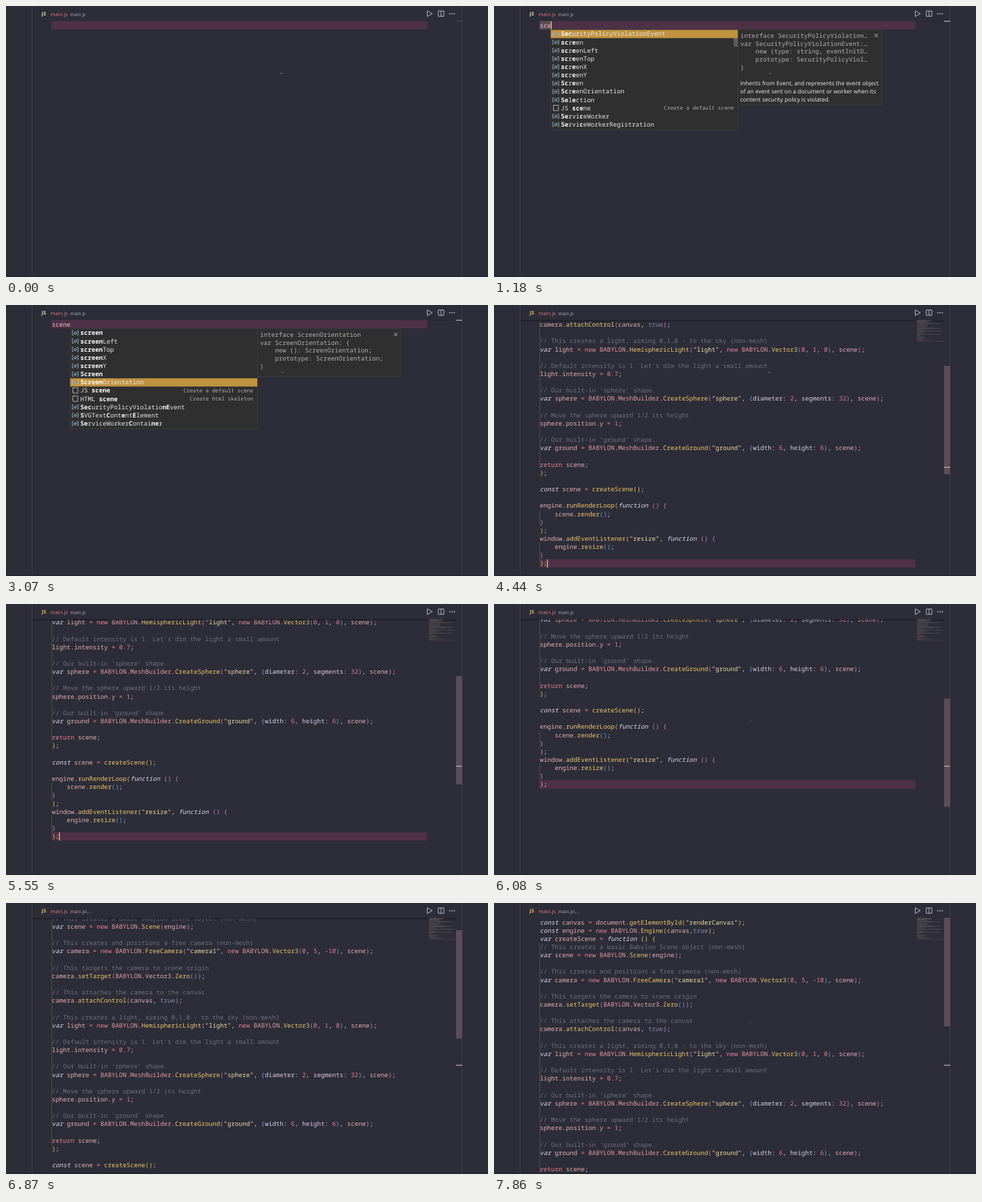
Animation of 710 by 400 pixels, one loop 8 s. Source, as an HTML page:

```html
<!DOCTYPE html>
<html lang="en">
<head>
<meta charset="utf-8">
<title>Editor snippet</title>
<style>
  html, body { margin: 0; width: 100%; height: 100%; overflow: hidden; background: #2c2d38; }
  svg { display: block; width: 710px; height: 400px; }
  text { white-space: pre; text-rendering: geometricPrecision; }
  .mono { font-family: "Noto Sans Mono", "DejaVu Sans Mono", monospace; font-size: 9.18px; }
  .ui { font-family: "Open Sans", "Noto Sans", sans-serif; }
  .b { font-weight: 700; fill: #fff; }
  .i { font-style: italic; }
</style>
</head>
<body>
<svg id="stage" viewBox="0 0 710 400" xmlns="http://www.w3.org/2000/svg">
  <defs>
    <clipPath id="view"><rect x="39" y="22" width="633" height="376"/></clipPath>
    <linearGradient id="shade" x1="0" y1="0" x2="0" y2="1">
      <stop offset="0" stop-color="#15161d" stop-opacity=".6"/>
      <stop offset="1" stop-color="#15161d" stop-opacity="0"/>
    </linearGradient>
  </defs>
  <rect width="710" height="400" fill="#2c2d38"/>
  <path d="M38.5 0V398M671.5 0V398" stroke="#3d3e4a"/>
  <rect y="398" width="710" height="2" fill="#262733"/>

  <g clip-path="url(#view)">
    <g id="doc">
      <rect id="row" x="67" width="553.5" height="12.2" fill="#4f3147"/>
      <rect id="word" x="67" y="22.3" height="12.2" fill="#5e4d56"/>
      <g id="code"></g>
      <text id="typed" class="mono" x="67.4" y="31.5" fill="#e4b9c1"></text>
      <rect id="caret" width="1.1" height="12" fill="#efd9a0"/>
    </g>
    <rect id="shadow" x="39" y="22" width="624" height="4" fill="url(#shade)"/>
    <rect id="sketch" x="623" y="22" width="40" height="1" fill="#23242c"/>
    <g id="map"></g>
    <rect id="thumb" x="663" width="9" height="160" fill="#5e4b59"/>
  </g>
  <rect id="mark" x="663" width="9" height="1.2"/>

  <g class="ui">
    <text id="badge" x="52.6" y="14.4" font-size="7.3" font-weight="700">JS</text>
    <text x="65.5" y="14.6" font-size="7.6" fill="#df7480">main.js</text>
    <text id="crumb" x="94.6" y="14.6" font-size="6.8" fill="#aeb0ba"></text>
  </g>
  <g fill="none" stroke="#c3c4cc" stroke-width=".9">
    <path d="M620.5 7.2L628 11.3L620.5 15.4Z"/>
    <path d="M636.8 7.3H645V15.2H636.8ZM640.9 7.3V15.2"/>
  </g>
  <g fill="#c3c4cc">
    <circle cx="653.8" cy="11.4" r=".9"/><circle cx="657.1" cy="11.4" r=".9"/><circle cx="660.4" cy="11.4" r=".9"/>
  </g>
  <g id="popup"></g>
  <path id="pointer" d="M-1 0h1M1 .2h1" stroke="#b9bac2" stroke-width=".9"/>
</svg>

<script>
const LOOP = 8000, LINE = 12.15, CHAR = 5.508, LEFT = 67.4, TOP = 22.3;
const $ = id => document.getElementById(id);
const set = (id, attrs) => { for (const k in attrs) $(id).setAttribute(k, attrs[k]); };
const show = (id, on) => set(id, { visibility: on ? "visible" : "hidden" });
const esc = s => s.replace(/&/g, "&amp;").replace(/</g, "&lt;");

const source = `const canvas = document.getElementById("renderCanvas");
const engine = new BABYLON.Engine(canvas,true);
var createScene = function () {
// This creates a basic Babylon Scene object (non-mesh)
var scene = new BABYLON.Scene(engine);

// This creates and positions a free camera (non-mesh)
var camera = new BABYLON.FreeCamera("camera1", new BABYLON.Vector3(0, 5, -10), scene);

// This targets the camera to scene origin
camera.setTarget(BABYLON.Vector3.Zero());

// This attaches the camera to the canvas
camera.attachControl(canvas, true);

// This creates a light, aiming 0,1,0 - to the sky (non-mesh)
var light = new BABYLON.HemisphericLight("light", new BABYLON.Vector3(0, 1, 0), scene);

// Default intensity is 1. Let's dim the light a small amount
light.intensity = 0.7;

// Our built-in 'sphere' shape.
var sphere = BABYLON.MeshBuilder.CreateSphere("sphere", {diameter: 2, segments: 32}, scene);

// Move the sphere upward 1/2 its height
sphere.position.y = 1;

// Our built-in 'ground' shape.
var ground = BABYLON.MeshBuilder.CreateGround("ground", {width: 6, height: 6}, scene);

return scene;
};

const scene = createScene();

engine.runRenderLoop(function () {
    scene.render();
}
);
window.addEventListener("resize", function () {
    engine.resize();
}
);`.split("\n");
const LAST = source.length - 1;

// Syntax colouring; brackets are coloured by nesting depth.
const BRACKETS = ["#e6bf55", "#c77fc0", "#5b9fd0"];
let depth = 0;
function colour(tok, rest) {
  if (tok.startsWith("//")) return "#6d6f7b";
  if (tok[0] === '"') return "#ecd9a3";
  if (/^[({]$/.test(tok)) return BRACKETS[depth++ % 3];
  if (/^[)}]$/.test(tok)) return BRACKETS[(depth = Math.max(0, depth - 1)) % 3];
  if (/^(const|var|function)$/.test(tok)) return "#dfd3ea";
  if (/^(new|return)$/.test(tok)) return "#e5809a";
  if (tok === "true") return "#8f82ad";
  if (/^\d/.test(tok)) return "#ec7396";
  if (/^(BABYLON|MeshBuilder)$/.test(tok)) return "#e497a6";
  if (/^\w/.test(tok)) {
    if (rest[0] === "(") return "#efc56b";
    return rest[0] === ":" ? "#d8cbe4" : "#e5adb6";
  }
  return tok === "=" || tok === "-" ? "#e5809a" : "#cfccd6";
}
function highlight(line) {
  let out = "", at = 0;
  for (const [tok] of line.matchAll(/\/\/.*|"[^"]*"|[\d.]+\d|\w+|\s+|./g)) {
    at += tok.length;
    if (!tok.trim()) { out += tok; continue; }
    const italic = /^(const|var|function)$/.test(tok) ? ' class="i"' : "";
    out += `<tspan${italic} fill="${colour(tok, line.slice(at))}">${esc(tok)}</tspan>`;
  }
  return out;
}
const mono = (x, y, body, extra = "") => `<text class="mono" x="${x}" y="${y}" ${extra}>${body}</text>`;
const rect = (x, y, w, h, fill, extra = "") =>
  `<rect x="${x}" y="${y}" width="${w}" height="${h}" fill="${fill}" ${extra}/>`;

const guide = (from, to) => rect(67, TOP + from * LINE, .9, (to - from) * LINE, "#57504f");
$("code").innerHTML = guide(3, 31) + guide(36, 38) + guide(40, 42) +
  source.map((s, i) => mono(LEFT, TOP + i * LINE + 9.2, highlight(s))).join("");
$("map").innerHTML = source.map((s, i) => {
  const pad = s.length - s.trimStart().length;
  const fill = s.startsWith("//") ? "#6d6f7b" : "#b98f8c";
  return s ? rect(623 + pad * .4, 22.3 + i * .735, (s.length - pad) * .4, .5, fill, 'opacity=".5"') : "";
}).join("") + rect(623, 53, 39, .9, "#4c3a47");

// Completion lists; stars enclose the matched letters.
const lists = {
  s: "*s*cheduler|*s*creen|*s*creenLeft|*s*creenTop|*s*creenX|*s*creenY|*s*croll|*s*crollBy|*s*crollTo|*s*crollX|*s*crollY|*s*elf",
  sce: "*Sec*urityPolicyViolationEvent|*sc*r*e*en|*sc*r*e*enLeft|*sc*r*e*enTop|*sc*r*e*enX|*sc*r*e*enY|*Sc*r*e*en|*Sc*r*e*enOrientation|*Se*l*e*ction|JS *sce*ne|*Se*rvi*c*eWorker|*Se*rvi*c*eWorkerRegistration",
  scene: "*screen*|*screen*Left|*screen*Top|*screen*X|*screen*Y|*Screen*|*Screen*Orientation|JS *scene*|HTML *scene*|*Sec*urityPolicyViolatio*nE*vent|*S*VGText*C*ont*e*nt*E*lement|*Se*rviceWorker*C*ontai*ne*r"
};
lists.scen = lists.scene;
const notes = { JS: "Create a default scene", HTML: "Create html skeleton" };

const details = {
  violation: {
    code: ["interface SecurityPolicyViolation…", "var SecurityPolicyViolationEvent:…",
      "    new (type: string, eventInitD…", "    prototype: SecurityPolicyViol…", "}"],
    text: ["Inherits from Event, and represents the event object",
      "of an event sent on a document or worker when its", "content security policy is violated."]
  },
  orientation: {
    code: ["interface ScreenOrientation", "var ScreenOrientation: {",
      "    new (): ScreenOrientation;", "    prototype: ScreenOrientation;", "}"]
  },
  scheduler: { code: ["var scheduler: Scheduler"] },
  screen: { code: ["var screen: Screen"] },
  left: { code: ["var screenLeft: number"] },
  top: { code: ["var screenTop: number"] },
  y: { code: ["var screenY: number"] },
  snippet: { snippet: true }
};

// [start, typed text, selected row, details]
const phases = [
  [0, ""], [790, "s"], [920, "s", 0, "scheduler"], [1180, "sce", 0, "violation"],
  [1440, "scen", 0, "screen"], [1700, "scene", 0, "screen"], [1960, "scene", 1, "left"],
  [2550, "scene", 2, "top"], [2810, "scene", 4, "y"], [3070, "scene", 6, "orientation"],
  [3330, "scene", 7, "snippet"], [4440, ""]
];

function icon(x, y, snippet) {
  if (snippet) return `<rect x="${x + 4}" y="${y - 4}" width="7.4" height="7.8" fill="none" stroke="#cfcfcf" stroke-width=".9" stroke-dasharray="4 .7"/>`;
  return `<path d="M${x + 5} ${y - 3}h-1.8v6.2h1.8M${x + 10} ${y - 3}h1.8v6.2h-1.8" fill="none" stroke="#b5bcc4" stroke-width=".8"/>
    <path d="M${x + 5.6} ${y + .2}l2-2 2 1-.3 1.8-2 1.2-1.7-.8zM${x + 5.6} ${y + .2}l2 .6 2-1.6" fill="none" stroke="#6db2e6" stroke-width=".9"/>`;
}
const FRAME = 'stroke="#3f3f41" stroke-width=".8"';
function panel(x, d) {
  const tx = x + 3.6;
  let body = "", height;
  if (d.snippet) {
    const wrapped = source.flatMap(s => s.match(/.{1,35}/g) || [""]).slice(0, 27);
    depth = 0;
    height = 350;
    body = mono(tx, 46.8, notes.JS, 'fill="#a9a9a9"') +
      wrapped.map((s, i) => mono(tx, 62 + i * 12, highlight(s))).join("");
  } else {
    const text = d.text || [];
    height = 12 + d.code.length * 11.7 + (text.length && text.length * 12.1 + 4.2);
    body = d.code.map((s, i) => mono(tx, 46.8 + i * 11.75, s, 'fill="#b0b0b0"')).join("") +
      text.map((s, i) => `<text class="ui" x="${tx - .4}" y="${117.2 + i * 12}" font-size="8.43" fill="#f2f2f2">${s}</text>`).join("");
  }
  return rect(x, 35, 211.5, height, "#2f2f30", FRAME) + body +
    `<path d="M${x + 201} 41l5 5m0-5l-5 5" stroke="#d0d0d0" stroke-width=".9"/>`;
}
function popup([, typed, sel, detail]) {
  if (!detail) return "";
  const x = LEFT + typed.length * CHAR - .4;
  let out = rect(x, 35, 276, 147.8, "#2f2f30", FRAME);
  if (typed.length < 4) out += rect(x + 269.5, 35, 6, 25, "#5c5c5d");
  out += rect(x, 35.3 + sel * LINE, 275.6, LINE, "#c1923f");
  lists[typed].split("|").forEach((item, i) => {
    const y = 41.2 + i * 12.14, note = notes[item.split(" ")[0]];
    const label = item.split("*").map((s, k) => k % 2 ? `<tspan class="b">${s}</tspan>` : s).join("");
    out += icon(x, y, note) + mono(x + 14.9, y + 3.2, label, 'fill="#e6e6e6"');
    if (note) out += mono(x + 269.7, y + 2.8, note, 'text-anchor="end" fill="#acacac" style="font-size:7.8px"');
  });
  return out + panel(x + 276, details[detail]);
}

// Wheel notches: time and number of notches, positive is down.
const NOTCH = 38.35, START = 157.3;
const wheel = [[5280, 1], [5580, 1], [5880, 1], [6280, -1], [6410, -1],
  [6610, -2], [6740, -1], [6870, -1], [7070, -1], [7270, -1]];
const scrollAt = t => t < 4440 ? 0 :
  Math.max(0, wheel.reduce((s, [at, n]) => t >= at ? s + n * NOTCH : s, START));

function caretOn(t) {
  return t < 4440 ? t >= 790 && t < 2220 : (t - 4440) % 1000 < 500;
}

let current;
function render(t) {
  const phase = phases.filter(p => t >= p[0]).pop();
  const pasted = t >= 4440, typed = phase[1], s = scrollAt(t);
  if (phase !== current) {
    current = phase;
    $("popup").innerHTML = popup(phase);
    $("typed").textContent = typed;
  }
  const line = pasted ? LAST : 0, y = TOP + line * LINE;
  set("doc", { transform: `translate(0 ${-s})` });
  set("row", { y });
  set("word", { width: typed === "sce" ? 17 : 0 });
  set("caret", { x: LEFT + (pasted ? 2 : typed.length) * CHAR - .2, y: y + .2 });
  show("caret", caretOn(t));
  for (const id of ["code", "map", "thumb"]) show(id, pasted);
  show("sketch", typed);
  show("shadow", s > 0);
  set("thumb", { y: 22 + s * .4315 });
  set("mark", { y: pasted ? 238.9 : 21.9, fill: pasted ? "#c8abb3" : t < 790 ? "#4a4a55" : "#b5b5bc" });
  set("badge", { fill: pasted ? "#e3bd55" : "#ddd3ae" });
  $("crumb").textContent = t < 6610 ? "main.js" : "main.js\\...";

  const k = Math.min(1, Math.max(0, (t - 4510) / 700)), e = k * k * (3 - 2 * k);
  const px = t >= 1180 && t < 4440 ? 406.5 : 405 - 26.5 * e;
  set("pointer", {
    transform: `translate(${px} ${99.4 + 73 * e + (t >= 7070 ? 4.5 : 0)})`,
    opacity: 1 - .5 * e
  });
}

const began = performance.now();
function tick() {
  render((performance.now() - began) % LOOP);
  requestAnimationFrame(tick);
}
tick();
</script>
</body>
</html>
```
